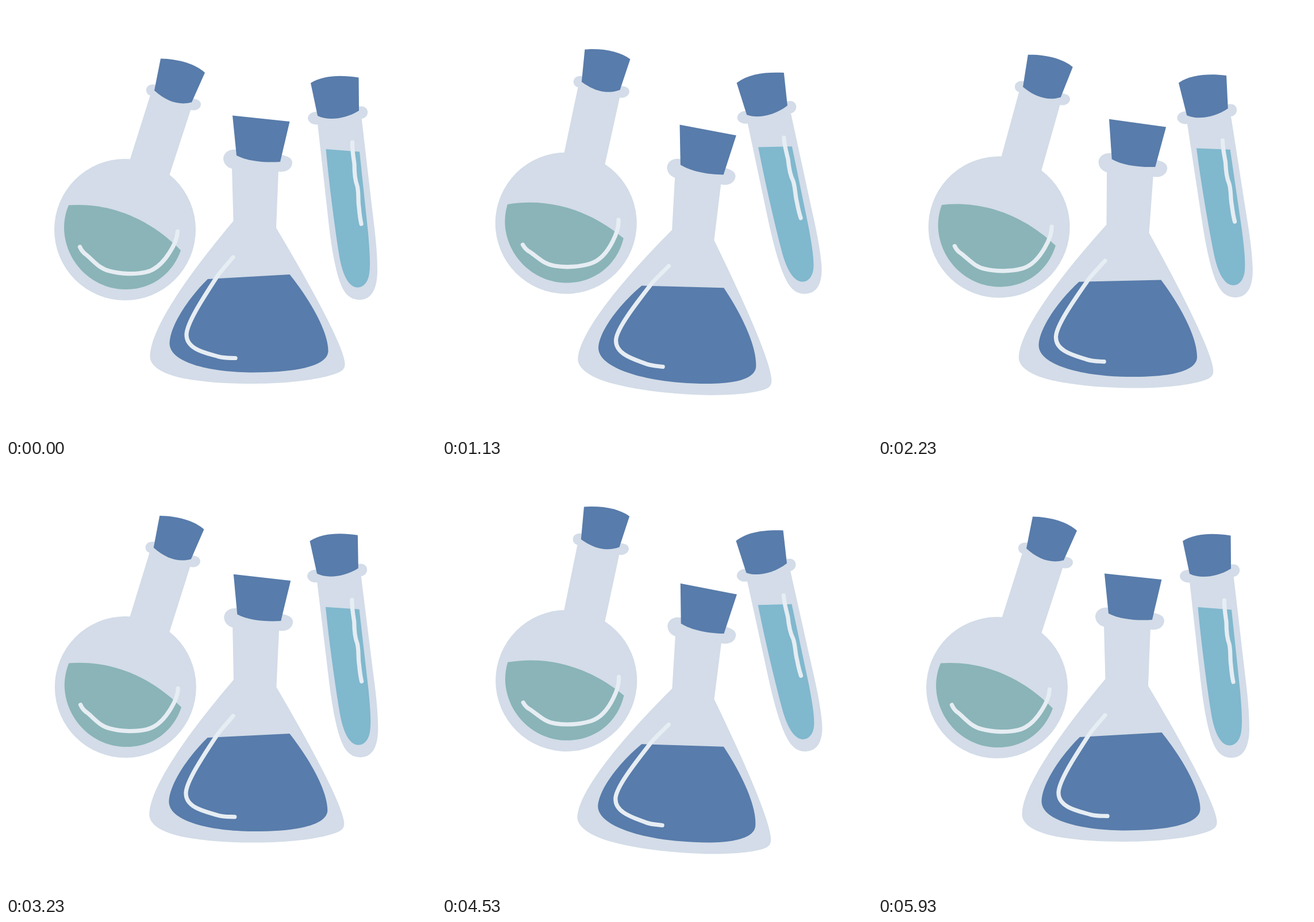
Recreate the animation shown at these times as an HTML page. Size 748 by 748 pixels, loop 6010 ms.

```html
<!DOCTYPE html>
<html lang="en">
<head>
<meta charset="utf-8">
<title>Swaying flasks</title>
<style>
  html, body { margin: 0; width: 100%; height: 100%; overflow: hidden; background: #fff; }
  svg { display: block; width: 100%; height: 100%; }
  .glass { fill: #d3dce8; }
  .blue { fill: #587cab; }
  .green { fill: #8ab4b8; }
  .teal { fill: #80b8ce; }
  .shine { fill: none; stroke: #e6edf3; stroke-width: 7.2; stroke-linecap: round; stroke-linejoin: round; }
</style>
</head>
<body>
<svg viewBox="0 0 748 748">
  <g id="round">
    <circle class="glass" cx="207" cy="389" r="123"/>
    <path class="glass" d="M251 155 L216 266 L230 330 L270 330 L285 292 L321.500 180Z"/>
    <path class="glass" d="M259 137 C249 135 243 141 244 148 C245 154 250 156 255 157 C275 168 300 178 322 181 C331 183 339 178 339 171 C339 165 333 162 325 161Z"/>
    <path class="blue" d="M269 91.500 C300 92 330 101 346 116 L323 167.500 C302 173 280 167 258 147Z"/>
    <path class="green" d="M109 346.500 C175 342 245 365 304 425 C290 465 255 493 208 493 C150 493 102 445 101 386 C101 372 104 358 109 346.500Z"/>
    <path class="shine" d="M128.500 419 C131 425 134 429 140 433 C155 446 163 457 180 461 C200 466.500 225 467 243 463 C262 459 275 444 285 428 C294 414 298 404 298.500 392"/>
  </g>
  <g id="tube">
    <path class="glass" d="M541.500 200 L561 375 C566 420 573 460 582 483 C589 502 600 511 615 511 C637 511 646 490 646 460 C646 420 640 380 636 345 L618 190Z"/>
    <path class="glass" d="M540 184 C531 184 525 189 525 196 C527 204 535 207 543 206 C575 208 600 203 619 196 C626 195 630 189 629 183 C628 176 621 173 613 175Z"/>
    <path class="blue" d="M530 134 C553 120 583 120 613.500 124.500 L614 182 C590 197 560 200 542 191Z"/>
    <path class="teal" d="M556.500 249 L615 253.500 L630 395 C633 430 634 450 632 465 C630 480 622 490 611 489.500 C597 489 585 470 579 430 C572 385 562 310 556.500 249Z"/>
    <path class="shine" d="M602.500 237 C602 250 604 260 606 275 C606 290 607 303 611 313 C614 325 612 338 614 350 C615 362 616 370 618 379"/>
  </g>
  <g id="cone">
    <path class="glass" d="M393 280 L395.500 374 C340 440 250 555 250.500 610 C251 628 275 641 310 648 C350 655 385 657 430 657 C490 657 545 650 575 639 C586 635 590 630 589.500 622 C588 590 520 470 470 386 L474 285Z"/>
    <path class="glass" d="M401 250 C387 248 378 256 378 266 C379 276 386 281 393 283 C420 288 450 288 474 288 C487 290 497 284 498 273 C498 265 491 261 479 259Z"/>
    <path class="blue" d="M394 190.500 L493.500 201 L477 271 C450 273 420 270 401 260Z"/>
    <path class="blue" d="M351 475 L493.500 467 C520 500 560 560 560.500 600 C560 625 510 637.500 430 637.500 C360 637.500 285 622 284.500 587 C285 555 320 505 351 475Z"/>
    <path class="shine" d="M395 437 C380 455 370 465 365 474 C345 505 315 550 314 571 C313 598 350 604 370 610 C382 613 390 612 399 612.500"/>
  </g>
</svg>
<script>
  const LOOP = 6010, SWAY = 3000, GAP = 250;
  // Sway amount at every GAP ms of one swing
  const pose = [0, 0.095, 0.33, 0.62, 0.86, 0.975, 1, 0.9, 0.645, 0.355, 0.14, 0.03];
  const parts = [
    { id: 'round', angle: -6, x: 96, y: 294 },
    { id: 'tube', angle: -6, x: 518, y: 312 },
    { id: 'cone', angle: 5, x: 207, y: 438 }
  ];
  for (const part of parts) part.node = document.getElementById(part.id);

  // Smooth closed curve through the poses
  function sway(t) {
    const n = pose.length, pos = (t % SWAY) / GAP, i = Math.floor(pos), u = pos - i;
    const [a, b, c, d] = [-1, 0, 1, 2].map(k => pose[(i + k + n) % n]);
    return b + u / 2 * (c - a + u * (2 * a - 5 * b + 4 * c - d + u * (3 * (b - c) + d - a)));
  }

  // Uneven cadence: the picture holds for 30 ms, then for 70 ms
  function held(t) {
    const base = Math.floor(t / 100) * 100;
    return Math.min(5930, base + (t - base >= 30 ? 30 : 0));
  }

  function draw(now) {
    const s = sway(held(now % LOOP));
    for (const { node, angle, x, y } of parts) {
      node.setAttribute('transform', `rotate(${angle * s} ${x} ${y})`);
    }
  }

  const start = performance.now();
  function tick() {
    draw(performance.now() - start);
    requestAnimationFrame(tick);
  }
  tick();
</script>
</body>
</html>
```
